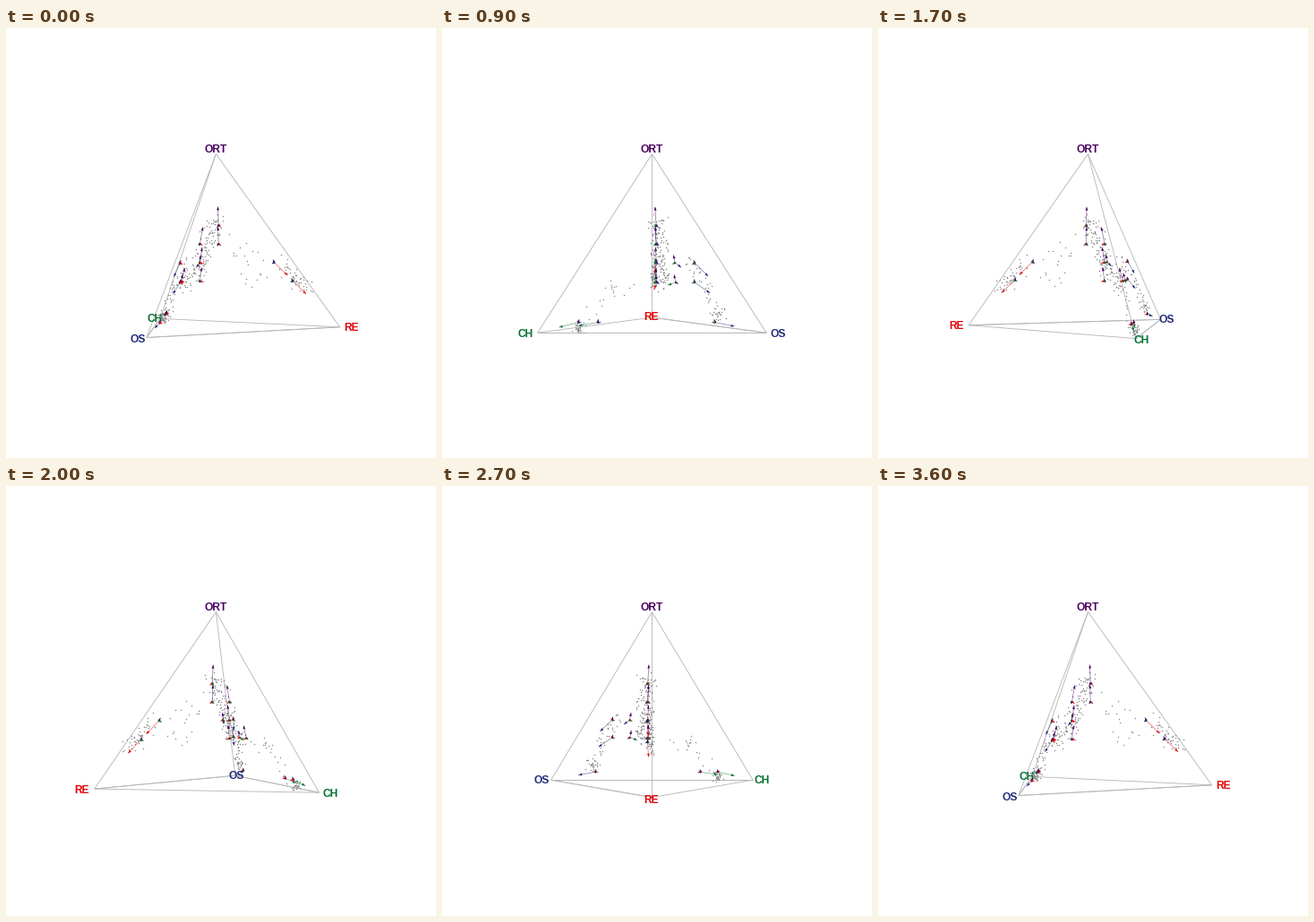
Animation, 480 px wide and 480 px high, one loop 3700 ms. Source, as a matplotlib script:

```python
import numpy as np
import matplotlib.pyplot as plt
from matplotlib.animation import FuncAnimation
from matplotlib.collections import LineCollection, PolyCollection

SIZE, FRAMES, STEP_MS = 480, 37, 100
PX = 0.72                      # points per pixel at 100 dpi
CX, CY = 234.4, 237.2          # screen centre of the turning axis
R, H = 138.2, 96.6             # base radius and half height
EYE = 8 * R
CELL = 20.7                    # grid spacing, also the longest arrow
SHORT = 3.6

COLORS = {"ORT": "#48005e", "RE": "#e60004", "CH": "#00702f", "OS": "#212b78"}
ANGLES = {"RE": 180, "OS": 60, "CH": -60}
rng = np.random.default_rng(7)


def corners(scale, height):
    """Tetrahedron corners with the base scaled and the apex at -height."""
    pts = {"ORT": np.array([0, -height, 0])}
    for name, deg in ANGLES.items():
        a = np.radians(deg)
        pts[name] = np.array([scale * R * np.sin(a), H, scale * R * np.cos(a)])
    return pts


VERTS, LABELS = corners(1, H), corners(1.1, 1.06 * H)

# Two of the edges are drawn twice and look heavier
EDGES = ["ORT RE", "ORT OS", "ORT CH", "RE CH", "RE OS", "OS CH", "RE OS", "OS CH"]
EDGE_PTS = np.array([[VERTS[n] for n in e.split()] for e in EDGES])


def project(p, turn):
    """Turn points about the vertical axis; return screen x, y and depth."""
    c, s = np.cos(turn), np.sin(turn)
    x, y, z = p[..., 0], p[..., 1], p[..., 2]
    xr, zr = x * c + z * s, z * c - x * s
    k = 1 / (1 - zr / EYE)
    return np.stack([CX + xr * k, CY + y * k], -1), zr


def branch(n, path, spread, power=1.0):
    """Scatter cells along a path; a power below 1 crowds them at its end."""
    path = np.array(path)
    t = rng.random(n) ** power * (len(path) - 1)
    line = np.stack([np.interp(t, range(len(path)), axis) for axis in path.T], -1)
    return line + np.clip(rng.normal(size=(n, 3)), -1.8, 1.8) * spread


def fan(n):
    """Sparse cells curving from the trunk over towards RE."""
    a, r = np.radians(rng.uniform(10, 115, n)), np.sqrt(rng.uniform(0.15, 1, n))
    return np.stack([rng.normal(3, 1.5, n), 35 - 58 * r * np.cos(a),
                     -8 - 50 * r * np.sin(a)], -1)


hub, os_end, ch_end = (13, 48, 30), (71, 78, 55), (-78, 92, 62)
CELLS = np.concatenate([
    fan(20),
    branch(130, [(7, -25, 1), (6, 0, 9), (10, 28, 20), hub], (6, 5, 6)),
    branch(34, [(36, 18, 28), (52, 42, 42), os_end], (4, 5, 3)),
    branch(20, [os_end] * 2, (4, 3.5, 3)),
    branch(20, [(-20, 50, 36), (-45, 54, 45), (-66, 84, 55)], (5, 6, 3)),
    branch(30, [ch_end] * 2, (3.5, 3, 2.5)),
    branch(48, [(3, 22, -68), (0.5, 57, -104)], (1.4, 5, 4), 0.6),
])


def grid_flows():
    """Yield grid nodes (column, row, layer) with the long arrows leaving them."""
    for row in range(4):
        for layer in range(row // 2, (row + 1) // 2 + 1):
            yield (0, row, layer), {"ORT": CELL * (1 - 0.09 * row)}
    for row, side in ((2, "OS"), (3, "CH")):
        yield (0, row, -1 - row), {"RE": CELL}
        yield (1, row, row - 1), {"ORT": 0.42 * CELL, side: 0.44 * CELL}
        yield (2, row, 2), {"OS": CELL}
    yield (3, 5, 3), {"OS": CELL}
    for col in (-3, -4):
        yield (col, 5, 3), {"CH": CELL}


def build_arrows():
    tails, tips, colors = [], [], []
    for node, long in grid_flows():
        start = np.array([4.7, -17, -2.8]) + CELL * np.array(node)
        for name, goal in VERTS.items():
            way = goal - start
            tails.append(start)
            tips.append(start + way / np.linalg.norm(way) * long.get(name, SHORT))
            colors.append(COLORS[name])
    return np.array(tails), np.array(tips), np.array(colors)


TAILS, TIPS, ARROW_COLORS = build_arrows()


def heads(tail, tip):
    """Small triangles ending at the arrow tips, foreshortened with the shaft."""
    d = tip - tail
    length = np.hypot(d[:, 0], d[:, 1])[:, None] + 1e-6
    u = d / length
    side = np.stack([-u[:, 1], u[:, 0]], -1) * 1.4
    back = tip - u * np.minimum(4, 1 + length * 0.75)
    return np.stack([tip, back + side, back - side], 1)


fig = plt.figure(figsize=(SIZE / 100, SIZE / 100), dpi=100, facecolor="white")
ax = fig.add_axes([0, 0, 1, 1])
ax.set(xlim=(0, SIZE), ylim=(SIZE, 0))
ax.axis("off")

edges = LineCollection([], colors="#b8b8b8", linewidths=0.9 * PX, zorder=1)
shafts = LineCollection([], linewidths=0.7 * PX, alpha=0.6, zorder=4)
tri = PolyCollection([], linewidths=0, zorder=5)
for coll in (edges, shafts, tri):
    ax.add_collection(coll, autolim=False)
dots = ax.scatter([], [], s=(1.5 * PX) ** 2, c="#8c8c8c", linewidths=0, zorder=3)
labels = {n: ax.text(0, 0, n, color=c, family="Liberation Sans", weight="bold",
                     size=12 * PX, ha="center", va="baseline", zorder=2)
          for n, c in COLORS.items()}


def update(i):
    turn = np.radians(10 * i - 90)
    edges.set_segments(project(EDGE_PTS, turn)[0])
    dots.set_offsets(project(CELLS, turn)[0])

    tail, _ = project(TAILS, turn)
    tip, depth = project(TIPS, turn)
    order = np.argsort(depth)
    tail, tip, colors = tail[order], tip[order], ARROW_COLORS[order]
    shafts.set_segments(np.stack([tail, tip], 1))
    shafts.set_color(colors)
    tri.set_verts(heads(tail, tip))
    tri.set_facecolor(colors)

    for name, text in labels.items():
        (x, y), _ = project(LABELS[name], turn)
        text.set_position((x - 0.4, y + 4.3))
    return edges, shafts, tri, dots, *labels.values()


anim = FuncAnimation(fig, update, frames=FRAMES, interval=STEP_MS,
                     repeat=True, repeat_delay=0, blit=False)
plt.show()
```
